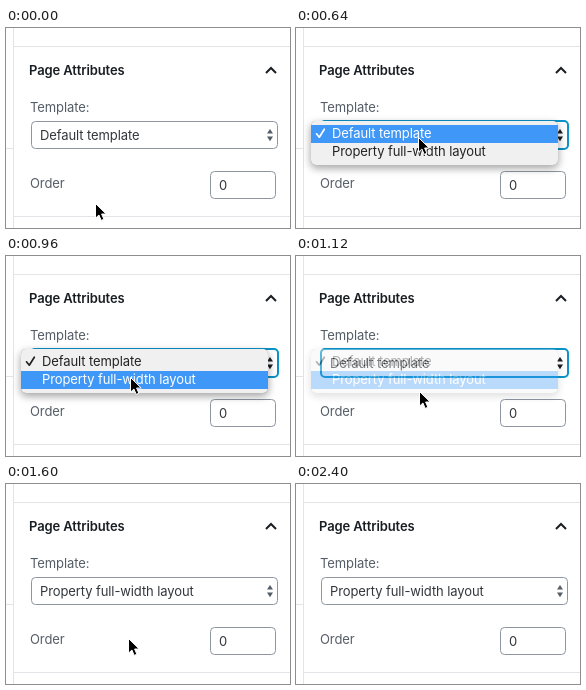
Recreate the animation shown at these times as an HTML page. Size 284 px wide and 200 px high, loop 2880 ms.

```html
<!DOCTYPE html>
<html lang="en">
<head>
<meta charset="utf-8">
<title>Page attributes</title>
<style>
  html, body { margin: 0; width: 100%; height: 100%; overflow: hidden; background: #fff; }
  svg { display: block; width: 100vw; height: 100vh; }
  text { font: 13px Inter, "Open Sans", sans-serif; letter-spacing: -.1px; fill: #32373c; white-space: pre; }
  .label { fill: #555d66; }
  .title { font-weight: 600; fill: #191e23; }
  .rule { stroke: #e2e4e7; }
  .field { fill: #fff; stroke: #8d96a0; }
  .arrows { fill: #555d66; }
  .focus { fill: #fff; stroke: #0a93c9; stroke-width: 2; }
  .menu text { fill: #222; }
  .menu .on { fill: #fff; }
  .bar { fill: #3f97f7; }
  .check { fill: none; stroke: #222; stroke-width: 1.7; stroke-linecap: round; stroke-linejoin: round; }
  .check.on { fill: none; stroke: #fff; }
  .panel { fill: #f0f0f0; filter: drop-shadow(0 3px 4px rgba(0, 0, 0, .28)) drop-shadow(0 0 .6px rgba(0, 0, 0, .45)); }

  .anim { animation: 2880ms step-end infinite; }
  .cursor { animation-name: cursor; }
  .ring { animation-name: ring; }
  .menu { animation-name: menu; }
  .first { animation-name: first; }
  .second { animation-name: second; }
  .before { animation-name: before; }
  .after { animation-name: after; }

  @keyframes cursor {
    0% { transform: translate(89px, 175px); opacity: 1; }
    5.555% { transform: translate(90px, 176px); }
    11.111% { transform: translate(99px, 166px); }
    16.666% { transform: translate(122px, 109px); }
    27.777% { transform: translate(123px, 117px); }
    33.333% { transform: translate(124px, 121px); }
    38.888% { transform: translate(123px, 135px); }
    44.444% { transform: translate(122px, 154px); }
    77.777% { transform: translate(122px, 166px); opacity: 1; }
    83.333%, 100% { transform: translate(122px, 166px); opacity: 0; }
  }
  @keyframes ring {
    0% { opacity: 0; }
    22.222% { opacity: 1; }
    55.555%, 100% { opacity: 0; }
  }
  @keyframes menu {
    0% { opacity: 0; }
    22.222% { opacity: 1; }
    38.888% { opacity: .36; }
    44.444%, 100% { opacity: 0; }
  }
  @keyframes first {
    0% { opacity: 1; }
    27.777%, 100% { opacity: 0; }
  }
  @keyframes second {
    0% { opacity: 0; }
    27.777%, 100% { opacity: 1; }
  }
  @keyframes before {
    0% { opacity: 1; }
    44.444%, 100% { opacity: 0; }
  }
  @keyframes after {
    0% { opacity: 0; }
    44.444%, 100% { opacity: 1; }
  }
</style>
</head>
<body>
<svg viewBox="0 0 284 200">
  <defs>
    <path id="arrows" d="M261 105.6l3-4.6 3 4.6zM261 108.6l3 4.6 3-4.6z"/>
    <path id="check" d="M20.5 105.8l2.8 3.4 5-8"/>
    <g id="items">
      <text x="36" y="110">Default template</text>
      <text x="36" y="128">Property full-width layout</text>
    </g>
  </defs>

  <path class="rule" d="M7.5 0V200M8 18.5H284M8 188.5H284M0 120.5H7"/>

  <text class="title" x="23" y="47">Page Attributes</text>
  <path d="M260 45l5-5 5 5" fill="none" stroke="#191e23" stroke-width="2"/>

  <text class="label" x="24" y="84">Template:</text>
  <rect class="field" x="25.5" y="93.5" width="246" height="27" rx="4"/>
  <use href="#arrows" class="arrows"/>
  <g class="anim ring">
    <rect class="focus" x="25" y="93" width="247" height="28" rx="4"/>
    <use href="#arrows" fill="#191e23"/>
  </g>
  <text class="anim before" x="34" y="112">Default template</text>
  <text class="anim after" x="34" y="112">Property full-width layout</text>

  <text class="label" x="24" y="160">Order</text>
  <rect class="field" x="204.5" y="143.5" width="65" height="27" rx="4"/>
  <text x="213" y="162">0</text>

  <g class="anim menu">
    <rect class="panel" x="15" y="93" width="247" height="44" rx="5"/>
    <g class="anim first">
      <rect class="bar" x="15" y="97" width="247" height="18"/>
      <text class="on" x="36" y="110">Default template</text>
      <use href="#check" class="check on"/>
      <text x="36" y="128">Property full-width layout</text>
    </g>
    <g class="anim second">
      <rect class="bar" x="15" y="115" width="247" height="18"/>
      <text x="36" y="110">Default template</text>
      <use href="#check" class="check"/>
      <text class="on" x="36" y="128">Property full-width layout</text>
    </g>
  </g>

  <g class="anim cursor">
    <path d="M.5 .5V15.2L3.9 12 6.2 17.4 8.9 16.2 6.6 11H11.2Z" fill="#000" stroke="#fff" stroke-linejoin="round"/>
  </g>
</svg>
</body>
</html>
```
